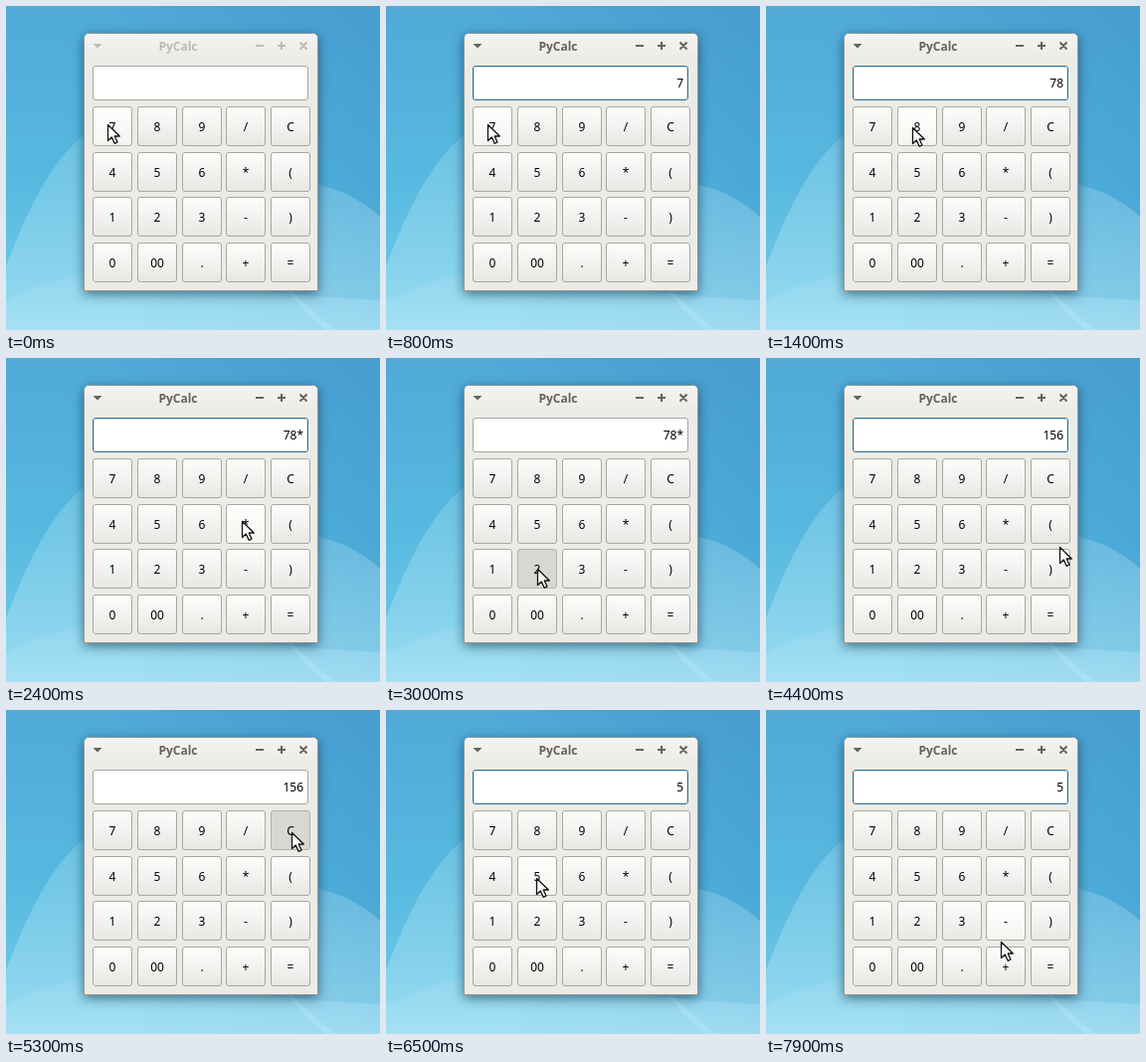
An HTML page for the animation above (8000 ms loop, 376x326 px).

```html
<!DOCTYPE html>
<html lang="en">
<head>
<meta charset="utf-8">
<title>PyCalc</title>
<style>
html, body { margin: 0; width: 100%; height: 100%; overflow: hidden; }
svg { display: block; }
text { font: 12px "Noto Sans", "Open Sans", sans-serif; fill: #000; }
.mid { text-anchor: middle; }
.win { filter: drop-shadow(0 3px 6px rgba(10, 40, 60, .6)); }
.key { fill: url(#key); stroke: #aaa7a2; }
.key.hover { fill: url(#hover); }
.key.down { fill: #d9d7d3; stroke: #b3b0ab; }
.entry { fill: #fff; stroke: #a9a6a1; }
.bar { --ink: #65625f; }
.bar.idle { --ink: #bcbab7; }
.bar text { font-weight: 700; fill: var(--ink); }
.bar .solid { fill: var(--ink); }
.bar .line { fill: none; stroke: var(--ink); stroke-width: 2; }
.focus .entry { stroke: #34708f; }
.focus .glow { opacity: 1; }
.glow { fill: none; stroke: #cfe2ec; opacity: 0; }
</style>
</head>
<body>
<svg width="376" height="326" viewBox="0 0 376 326">
  <defs>
    <linearGradient id="sky" x2="0" y2="1">
      <stop offset="0" stop-color="#50a9d7"/>
      <stop offset=".55" stop-color="#57bae0"/>
      <stop offset="1" stop-color="#74cdea"/>
    </linearGradient>
    <linearGradient id="shade">
      <stop offset=".3" stop-color="#3387c4" stop-opacity="0"/>
      <stop offset="1" stop-color="#3387c4" stop-opacity=".36"/>
    </linearGradient>
    <linearGradient id="hill" x2="0" y2="1">
      <stop offset="0" stop-color="#a5dcf0" stop-opacity=".32"/>
      <stop offset="1" stop-color="#b4e8f7" stop-opacity=".5"/>
    </linearGradient>
    <linearGradient id="key" x2="0" y2="1">
      <stop offset="0" stop-color="#fdfdfc"/>
      <stop offset="1" stop-color="#e9e7e4"/>
    </linearGradient>
    <linearGradient id="hover" x2="0" y2="1">
      <stop offset="0" stop-color="#fff"/>
      <stop offset="1" stop-color="#f5f4f1"/>
    </linearGradient>
    <linearGradient id="title" x2="0" y2="1">
      <stop offset="0" stop-color="#f5f4f3"/>
      <stop offset="1" stop-color="#edebe6"/>
    </linearGradient>
  </defs>

  <path fill="url(#sky)" d="M0 0H376V326H0z"/>
  <path fill="url(#shade)" d="M0 0H376V326H0z"/>
  <path fill="url(#hill)" d="M0 262C22 205 46 152 84 126C150 90 200 230 290 290L330 326H0z"/>
  <path fill="url(#hill)" d="M0 297C40 275 90 262 150 270S250 290 376 296V326H0z"/>
  <path fill="url(#hill)" d="M230 200C280 165 335 175 376 212V326H322C306 314 294 302 283 286z"/>

  <g class="win">
    <path fill="#edebe6" stroke="#8d9699" d="M78.500 286.500V32.500q0-5 5-5H308.500q5 0 5 5V286.500z"/>
    <path fill="url(#title)" d="M79 52V33q0-5 5-5H308q5 0 5 5V52z"/>
  </g>
  <g class="bar" id="bar">
    <path class="solid" d="M87.500 38h9l-4.500 4.500z"/>
    <text class="mid" x="173" y="45">PyCalc</text>
    <path class="line" d="M251 40h8M273 40h8M277 36v8M295.500 36.500l7 7M302.500 36.500l-7 7"/>
  </g>
  <g id="field">
    <rect class="entry" x="87.500" y="60.500" width="216" height="34" rx="2.500"/>
    <rect class="glow" x="88.500" y="61.500" width="214" height="32" rx="1.500"/>
    <text id="value" x="299" y="82" text-anchor="end"></text>
  </g>
  <g id="keys"></g>
  <path id="arrow" fill="#fff" stroke="#111" stroke-width="1.300" stroke-linejoin="round"
    d="M.5.5V16.500L4.300 13L7.200 19.300L10 18L7.200 12H12.300z"/>
</svg>
<script>
const LOOP = 8000, STEP = 100;
const LABELS = ['7', '8', '9', '/', 'C', '4', '5', '6', '*', '(',
  '1', '2', '3', '-', ')', '0', '00', '.', '+', '='];
const COLS = [87, 132, 177, 221, 266], ROWS = [101, 147, 192, 238];

// start, end, target x, target y, sideways bend x, y
const MOVES = [
  [900, 1000, 147, 122, 0, 0],
  [1600, 2100, 237, 164, 0, 0],
  [2500, 2800, 152, 212, 0, 0],
  [3200, 3600, 293, 257, 0, 0],
  [4100, 4800, 287, 123, 5, 0],
  [5500, 6100, 151, 169, 0, 20],
  [6600, 7300, 247, 160, 0, 0],
  [7400, 7600, 228, 212, 0, 0],
  [7800, 7900, 236, 233, 0, 0]
];
// press time, release time, key
const PRESSES = [[700, 800, '7'], [1200, 1300, '8'], [3000, 3100, '2'],
  [3800, 3900, '='], [5300, 5400, 'C']];
const VALUES = [[0, ''], [800, '7'], [1300, '78'], [2400, '78*'], [3100, '78*2'],
  [3900, '156'], [5400, ''], [6500, '5']];

const $ = id => document.getElementById(id);
const bar = $('bar'), field = $('field'), value = $('value'), arrow = $('arrow');

function add(tag, attrs, text = '') {
  const el = document.createElementNS('http://www.w3.org/2000/svg', tag);
  for (const name in attrs) el.setAttribute(name, attrs[name]);
  el.textContent = text;
  return $('keys').appendChild(el);
}

const keys = LABELS.map((label, i) => {
  const x = COLS[i % 5], y = ROWS[Math.floor(i / 5)];
  const rect = add('rect', { class: 'key', x: x + .5, y: y + .5, width: 39, height: 39, rx: 2.5 });
  add('text', { class: 'mid', x: x + 20, y: y + 25 }, label);
  return { label, x, y, rect };
});

function pointer(t) {
  let x = 102, y = 119;
  for (const [start, end, tx, ty, bx, by] of MOVES) {
    if (t < start) break;
    const p = Math.min(1, (t - start + STEP) / (end - start + STEP));
    const e = p * p * (3 - 2 * p), arc = Math.sin(Math.PI * e);
    x += (tx - x) * e + bx * arc;
    y += (ty - y) * e + by * arc;
  }
  return [Math.round(x), Math.round(y)];
}

function draw(now) {
  const t = Math.floor(now % LOOP / STEP) * STEP;
  const [x, y] = pointer(t);
  const press = PRESSES.find(([from, to]) => t >= from && t < to);
  arrow.setAttribute('transform', `translate(${x} ${y})`);
  value.textContent = VALUES.filter(([from]) => t >= from).pop()[1];
  bar.classList.toggle('idle', t < 700);
  field.classList.toggle('focus', t >= 800 && !press);
  for (const k of keys) {
    const over = x >= k.x && x < k.x + 40 && y >= k.y && y < k.y + 42;
    k.rect.classList.toggle('hover', over);
    k.rect.classList.toggle('down', !!press && press[2] === k.label);
  }
}

const begin = performance.now();
function tick() {
  draw(performance.now() - begin);
  requestAnimationFrame(tick);
}
tick();
</script>
</body>
</html>
```
